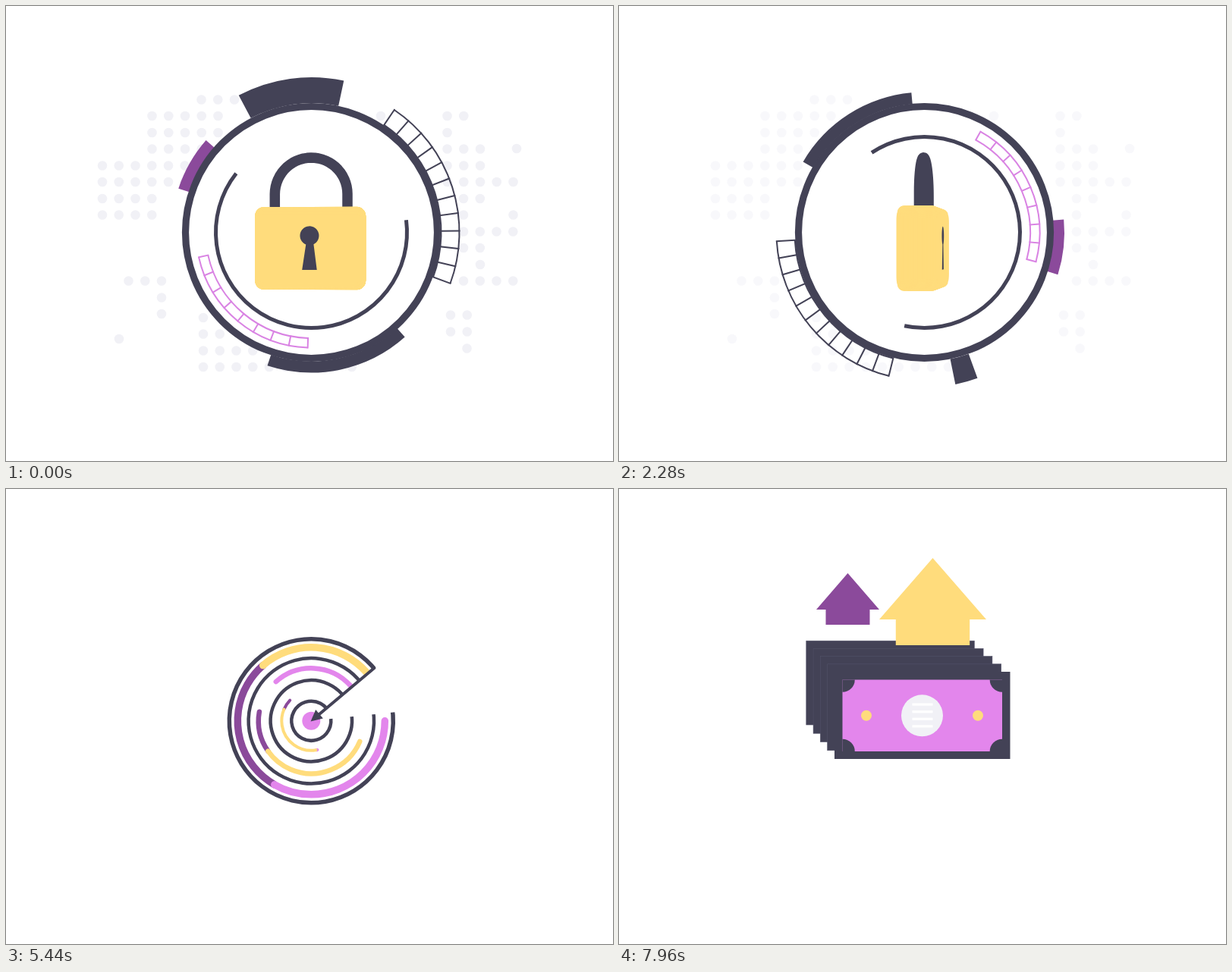
Recreate the animation shown at these times as an HTML page with a canvas. Size 800 by 600 pixels, loop 8 s.

```html
<!DOCTYPE html>
<html lang="en">
<head>
<meta charset="utf-8">
<title>Security loop</title>
<style>
html, body { margin: 0; width: 100%; height: 100%; overflow: hidden; background: #fff; }
canvas { display: block; }
</style>
</head>
<body>
<canvas id="stage" width="800" height="600"></canvas>
<script>
const ctx = document.getElementById('stage').getContext('2d');
const DARK = '#434256', YELLOW = '#ffdc7c', PURPLE = '#8b4a9b', PINK = '#e386ec', PALE = '#f1f1f6';
const LOOP = 8000, RAD = Math.PI / 180;

const clamp = x => Math.min(1, Math.max(0, x));
const mix = (a, b, u) => a + (b - a) * u;
const ramp = (t, start, length) => clamp((t - start) / length);
const inOut = x => x < .5 ? 4 * x ** 3 : 1 - 4 * (1 - x) ** 3;
const easeOut = x => 1 - (1 - x) ** 3;
const backOut = x => 1 + 2.9 * (x - 1) ** 3 + 1.9 * (x - 1) ** 2;
const smooth = (t, start, length) => inOut(ramp(t, start, length));

function polygon(points, color) {
  ctx.beginPath();
  points.forEach(p => ctx.lineTo(...p));
  ctx.closePath();
  ctx.fillStyle = color;
  ctx.fill();
}

function disc(x, y, r, color) {
  ctx.beginPath();
  ctx.arc(x, y, Math.max(0, r), 0, 7);
  ctx.fillStyle = color;
  ctx.fill();
}

function box(left, top, right, bottom, color) {
  ctx.fillStyle = color;
  ctx.fillRect(left, top, right - left, bottom - top);
}

function arc(r, from, to, width, color, cap = 'butt') {
  if (to - from < .05) return;
  ctx.beginPath();
  ctx.arc(0, 0, r, from * RAD, to * RAD);
  ctx.lineWidth = width;
  ctx.lineCap = cap;
  ctx.strokeStyle = color;
  ctx.stroke();
}

function at(x, y, scale, draw) {
  ctx.save();
  ctx.translate(x, y);
  ctx.scale(scale, scale);
  draw();
  ctx.restore();
}

// Rows of background dots: first x, y, count
const DOT_ROWS = [
  [257.5, 123.5, 3], [192.5, 145, 5], [192.5, 167, 5], [192.5, 188.5, 4],
  [127, 210.5, 6], [127, 232, 6], [127, 254, 4], [127, 275.5, 4],
  [494, 145, 1], [581.5, 145, 2], [581.5, 167, 1], [581.5, 188.5, 3], [673, 188, 1],
  [581.5, 210.5, 3], [581.5, 232, 5], [603, 254, 2], [603, 275.5, 1], [668.5, 275.5, 1],
  [603, 297.5, 4], [603, 319, 2], [625, 341, 1], [603, 362.5, 4],
  [161.5, 362.5, 3], [205, 384.5, 1], [205, 406, 1], [149, 439, 1],
  [586, 407.5, 2], [586, 429.5, 2], [607.5, 451.5, 1],
  [260, 411, 1], [260, 432.5, 2], [260, 454.5, 4], [260, 476, 10]
];

function backgroundDots(t) {
  ctx.globalAlpha = 1 - ramp(t, 1960, 640);
  for (const [x, y, count] of DOT_ROWS)
    for (let i = 0; i < count; i++) disc(x + 21.75 * i, y, 6.3, PALE);
  ctx.globalAlpha = 1;
}

function ladder(inner, outer, from, to, cells, color) {
  if (to - from < .3) return;
  arc(inner, from, to, 2, color);
  arc(outer, from, to, 2, color);
  ctx.beginPath();
  for (let i = 0; i <= cells; i++) {
    const a = mix(from, to, i / cells) * RAD;
    ctx.moveTo(inner * Math.cos(a), inner * Math.sin(a));
    ctx.lineTo(outer * Math.cos(a), outer * Math.sin(a));
  }
  ctx.lineCap = 'square';
  ctx.stroke();
}

function dial(t) {
  const turn = .0686 * t, back = -.067 * t, fast = .107 * t;
  const shrink = (start, from, to) => mix(from, to, smooth(t, start, 450));
  ladder(171, 195, turn + shrink(2180, -56, 20.1), turn + 20.1, 11, DARK);
  arc(187.5, turn + shrink(2000, -118, -78), turn - 78, 34, DARK);
  arc(177.5, turn + shrink(2153, 48.2, 108.2), turn + 108.2, 15, DARK);
  arc(177, turn + shrink(2280, 198.2, 221.1), turn + 221.1, 15, PURPLE);
  disc(0, 0, 164, '#fff');
  arc(166, -90 + 360 * smooth(t, 2520, 460), 270, 9.2, DARK);
  arc(126, fast + shrink(2320, -7.5, 218), fast + 218, 5, DARK);
  ladder(139.5, 152, back + 91.9, back + shrink(2300, 167.6, 91.9), 8, '#d983e3');
}

// Rotates about the vertical axis and applies perspective
function projector(angle) {
  const c = Math.cos(angle), s = Math.sin(angle);
  return (x, y, z) => {
    const k = 1230 / (1230 + x * s - z * c);
    return [(x * c + z * s) * k, y * k];
  };
}

function roundedRect(w, h, r) {
  const points = [];
  for (let i = 0; i < 32; i++) {
    const q = Math.floor(i / 8), a = (q * 90 + (i % 8) * 90 / 7) * RAD;
    const sx = q === 0 || q === 3 ? 1 : -1, sy = q < 2 ? 1 : -1;
    points.push([sx * (w - r) + r * Math.cos(a), sy * (h - r) + r * Math.sin(a)]);
  }
  return points;
}

function padlock(t) {
  const angle = (-4.5 - .1197 * t) * RAD, project = projector(angle), depth = 25;
  ctx.beginPath();
  ctx.lineTo(...project(-48, -50, 0));
  for (let a = 180; a <= 360; a += 6)
    ctx.lineTo(...project(48 * Math.cos(a * RAD), -71.5 + 48 * Math.sin(a * RAD), 0));
  ctx.lineTo(...project(48, -50, 0));
  ctx.lineWidth = 13.5;
  ctx.lineJoin = 'round';
  ctx.lineCap = 'butt';
  ctx.strokeStyle = DARK;
  ctx.stroke();

  ctx.lineWidth = 1.5;
  ctx.strokeStyle = YELLOW;
  for (let z = -depth; z <= depth; z++) {
    const bevel = Math.max(0, Math.abs(z) - 17), inset = 8 - Math.sqrt(64 - bevel * bevel);
    polygon(roundedRect(71 - inset / 4, 53 - inset, 10).map(p => project(...p, z)), YELLOW);
    ctx.stroke();
  }
  if (Math.cos(angle) > .02) {
    const hole = [];
    for (let a = 112; a <= 428; a += 8)
      hole.push([12.3 * Math.cos(a * RAD), -16.3 + 12.3 * Math.sin(a * RAD)]);
    hole.push([9.6, 28], [-9.6, 28]);
    polygon(hole.map(p => project(...p, depth)), DARK);
  }
}

function lockScene(t) {
  backgroundDots(t);
  at(402.5, 298.5, 1, () => dial(t));
  const size = 1 - smooth(t, 2520, 360);
  if (size > 0) at(402, 319.5, size, () => padlock(t));
}

// Radius, width, centre angle, drawing start
const RINGS = [[108, 5.5, 148.5, 3000], [82.7, 4.5, 143, 3013], [53.6, 4.5, 160, 3062], [26, 4.5, 163, 3090]];
// Radius, width, start time, segments as [from, to, color]
const BANDS = [
  [97, 9.5, 5080, [[120, 229, PURPLE], [0, 120, PINK], [229, 323, YELLOW]]],
  [69.5, 6.5, 5110, [[145, 190, PURPLE], [228, 323, PINK], [23, 145, YELLOW]]],
  [39, 4, 5140, [[203, 224, PURPLE], [78, 80, PINK], [81, 203, YELLOW]]]
];

function dart(distance, size) {
  ctx.save();
  ctx.rotate(-40 * RAD);
  ctx.translate(distance, 0);
  ctx.beginPath();
  ctx.moveTo(8 * size, 0);
  ctx.lineTo(108.5 * size, 0);
  ctx.lineWidth = 4;
  ctx.lineCap = 'round';
  ctx.strokeStyle = DARK;
  ctx.stroke();
  polygon([[-1, 0], [14 * size, -7.5 * size], [14 * size, 7.5 * size]], DARK);
  ctx.restore();
}

function radarScene(t) {
  const hit = 4480, since = Math.max(0, t - hit);
  const bounce = .63 * Math.exp(-since / 110) * Math.sin(since / 70);
  const scale = 1 + .04 * (1 - ramp(t, 3280, 160)) + bounce;
  const edge = mix(-40, -6, smooth(t, 5100, 300)) + 326 * smooth(t, 5900, 360);
  const remain = 1 - smooth(t, 6060, 200);

  at(402.3, 305.8, scale, () => {
    ctx.save();
    if (edge > -40) {
      ctx.beginPath();
      ctx.moveTo(0, 0);
      ctx.arc(0, 0, 200, edge * RAD, 320 * RAD);
      ctx.clip();
    }
    for (const [r, width, middle, start] of RINGS) {
      const half = 180 * smooth(t, start, 400);
      arc(r, middle - half, middle + half, width, DARK);
    }
    for (const [r, width, start, parts] of BANDS) {
      const grow = smooth(t, start, 300);
      for (const [from, to, color] of parts) arc(r, from, mix(from, to, grow), width, color, 'round');
    }
    ctx.restore();
    disc(0, 0, 12 * remain * smooth(t, 2860, 250), t < hit ? DARK : PINK);
  });
  if (t > 4240 && remain > 0)
    at(402.3, 305.8, 1, () => dart(480 * (1 - ramp(t, 4240, hit - 4240) ** 2), remain));
}

function banknote(y) {
  box(284, y, 515.5, y + 115, DARK);
  ctx.save();
  ctx.beginPath();
  ctx.rect(294.5, y + 10.5, 210.5, 94.5);
  ctx.clip();
  box(294, y + 10, 506, y + 106, PINK);
  for (const cx of [294.5, 505]) for (const cy of [10.5, 105]) disc(cx, y + cy, 16.3, DARK);
  ctx.restore();
  disc(326, y + 57.8, 7, YELLOW);
  disc(473, y + 57.8, 7, YELLOW);
  disc(399.5, y + 57.8, 27.5, PALE);
  for (let i = 0; i < 4; i++) box(386.5, y + 41.5 + 9.6 * i, 413.5, y + 44.7 + 9.6 * i, '#fff');
}

function stack(t) {
  for (let i = 4; i > 0; i--) {
    const n = i * backOut(ramp(t, 7040 + 110 * i, 400));
    const left = 284 - 9.3 * n, top = 241 - 10.2 * n, right = 515.5 - 11.8 * n, bottom = 356 - 11.25 * n;
    box(left, top, right, bottom, DARK);
    ctx.lineWidth = .6;
    ctx.strokeStyle = '#525168';
    ctx.strokeRect(left, top, right - left, bottom - top);
  }
}

function upArrow(x, tip, size, color, [head, headHeight, stem, height]) {
  if (size <= 0) return;
  at(x, tip, size, () => polygon([
    [0, 0], [head, headHeight], [stem, headHeight], [stem, height],
    [-stem, height], [-stem, headHeight], [-head, headHeight]
  ], color));
}

function line(t) {
  const gap = 404 * smooth(t, 6780, 260);
  const span = (half, color) => {
    if (half <= gap) return;
    box(403 - half, 304, 403 - gap, 309, color);
    box(403 + gap, 304, 403 + half, 309, color);
  };
  span(404 * easeOut(ramp(t, 6160, 320)), PINK);
  span(404 * ramp(t, 6320, 452), YELLOW);
}

function moneyScene(t) {
  if (t > 7040) stack(t);
  const rise = backOut(ramp(t, 7200, 440)), pop = backOut(ramp(t, 7540, 400));
  upArrow(413.5, mix(241, 91, rise), Math.min(1, rise), YELLOW, [70.5, 81, 48.7, 115]);
  upArrow(301.5, mix(235, 111, pop), Math.min(1, pop), PURPLE, [41.5, 48, 29, 68]);

  const lift = easeOut(ramp(t, 6400, 280)), settle = smooth(t, 6720, 320);
  if (lift > 0) {
    ctx.save();
    ctx.beginPath();
    ctx.rect(0, 0, 800, mix(304, 357, settle));
    ctx.clip();
    banknote(mix(304, 214, lift) + 27 * settle);
    ctx.restore();
  }
  line(t);
}

function frame(now) {
  const t = now % LOOP;
  box(0, 0, 800, 600, '#fff');
  if (t < 3000) lockScene(t);
  if (t > 2860 && t < 6300) radarScene(t);
  if (t > 6160) moneyScene(t);
  requestAnimationFrame(() => frame(performance.now() - begin));
}

const begin = performance.now();
frame(0);
</script>
</body>
</html>
```
